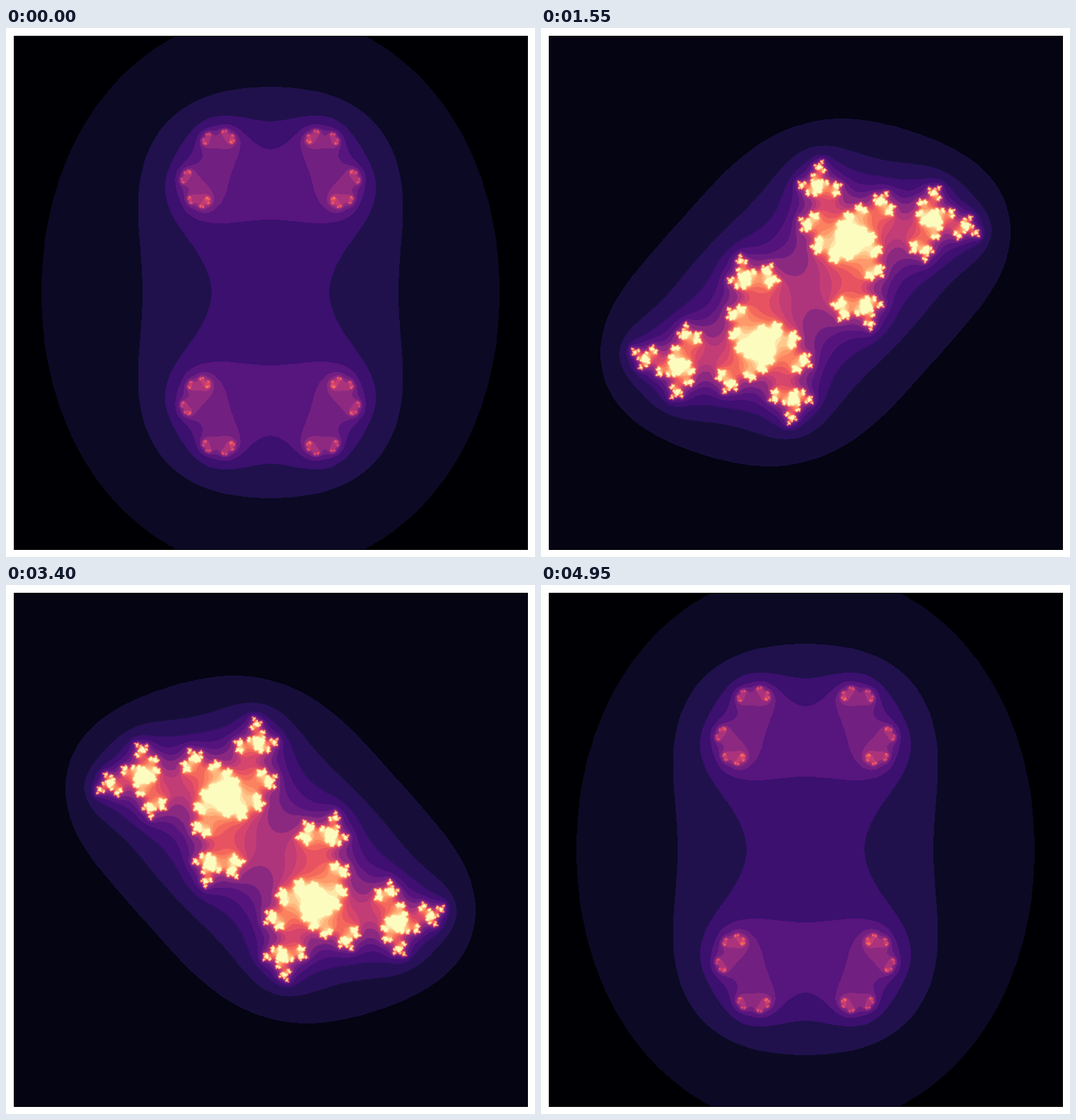
Write an HTML page with a canvas that moves like this. It is 748 px wide and 748 px high and loops after 5000 ms.

```html
<!DOCTYPE html>
<html lang="en">
<head>
<meta charset="utf-8">
<title>Julia set</title>
<style>
  html, body { margin: 0; width: 100%; height: 100%; overflow: hidden; background: #fff; }
  canvas { display: block; }
</style>
</head>
<body>
<canvas id="stage" width="748" height="748"></canvas>
<script>
const STAGE = 748, FRAMES = 100, FRAME_MS = 50;
const GRID = 800, MAX_STEP = 19, ESCAPE = 4, C_RADIUS = 0.7885;
const MARGIN = 11.2, LEFT = 11, SIZE = STAGE - 2 * LEFT;

// Magma colours at every eighth of 256 levels
const STOPS = (
  '000004 030312 0a0822 130d34 1d1147 29115a 36106b 440f76 51127c 5d177f 6a1c81 ' +
  '762181 832681 902a81 9c2e7f aa337d b73779 c43c75 d0416f dc4869 e75263 ef5d5e ' +
  'f56b5c f9795d fc8961 fd9869 fea772 feb67c fec488 fed395 fde2a3 fcf0b2 fcffc1'
).split(' ').map(hex => [0, 2, 4].map(i => parseInt(hex.substr(i, 2), 16)));

const magma = Array.from({ length: 256 }, (_, level) => {
  const low = STOPS[level >> 3], high = STOPS[(level >> 3) + 1], mix = (level & 7) / 8;
  return low.map((v, i) => Math.round(v + (high[i] - v) * mix));
});

function bSpline(x) {
  x = Math.abs(x);
  if (x < 1) return 2 / 3 - x * x + x * x * x / 2;
  return x < 2 ? (2 - x) ** 3 / 6 : 0;
}

// Smoothing taps that map the grid onto stage pixels
const cell = GRID / (STAGE - 2 * MARGIN);
const taps = Array.from({ length: SIZE }, (_, p) => {
  const centre = (p + LEFT + 0.5 - MARGIN) * cell - 0.5;
  const list = [];
  let sum = 0;
  for (let k = Math.ceil(centre - 2 * cell); k <= centre + 2 * cell; k++) {
    const weight = bSpline((k - centre) / cell);
    list.push({ at: Math.min(GRID - 1, Math.max(0, k)), weight });
    sum += weight;
  }
  list.forEach(tap => tap.weight /= sum);
  return list;
});

function escapeStep(x, y, cx, cy) {
  for (let i = 0; i < MAX_STEP; i++) {
    const nx = x * x - y * y + cx;
    y = 2 * x * y + cy;
    x = nx;
    if (x * x + y * y > ESCAPE * ESCAPE) return i;
  }
  return MAX_STEP;
}

// The set is symmetric about the origin, so half the grid is enough
function juliaGrid(angle) {
  const cx = C_RADIUS * Math.cos(angle), cy = C_RADIUS * Math.sin(angle);
  const grid = new Float32Array(GRID * GRID);
  const coord = i => -2 + 4 * i / (GRID - 1);
  let max = 0;
  for (let row = 0, n = 0; row < GRID / 2; row++) {
    const y = coord(row);
    for (let col = 0; col < GRID; col++, n++) {
      const step = escapeStep(coord(col), y, cx, cy);
      grid[n] = grid[grid.length - 1 - n] = step;
      if (step > max) max = step;
    }
  }
  return { grid, max };
}

function resample(grid) {
  const rows = new Float32Array(SIZE * GRID);
  const out = new Float32Array(SIZE * SIZE);
  for (let y = 0; y < SIZE; y++) {
    for (const { at, weight } of taps[y]) {
      for (let x = 0; x < GRID; x++) rows[y * GRID + x] += weight * grid[at * GRID + x];
    }
  }
  for (let x = 0; x < SIZE; x++) {
    for (const { at, weight } of taps[x]) {
      for (let y = 0; y < SIZE; y++) out[y * SIZE + x] += weight * rows[y * GRID + at];
    }
  }
  return out;
}

// Levels in the same coarse colour box share their mean colour
function reducedPalette(counts) {
  const boxes = new Map();
  const key = ([r, g, b]) => (r >> 5) << 8 | (g >> 4) << 4 | b >> 5;
  magma.forEach((colour, level) => {
    const k = key(colour);
    if (!boxes.has(k)) boxes.set(k, { n: 0, sum: [0, 0, 0] });
    const box = boxes.get(k);
    box.n += counts[level];
    colour.forEach((v, i) => box.sum[i] += v * counts[level]);
  });
  return magma.map(colour => {
    const { n, sum } = boxes.get(key(colour));
    return n ? sum.map(v => Math.round(v / n)) : colour;
  });
}

function renderJulia(angle) {
  const { grid, max } = juliaGrid(angle);
  const levels = Uint8Array.from(resample(grid),
    v => Math.max(0, Math.min(255, Math.floor(v / max * 256))));
  const counts = new Uint32Array(256);
  for (const level of levels) counts[level]++;
  const palette = reducedPalette(counts).map(([r, g, b]) => (255 << 24 | b << 16 | g << 8 | r) >>> 0);

  const canvas = document.createElement('canvas');
  canvas.width = canvas.height = SIZE;
  const image = new ImageData(SIZE, SIZE);
  const pixels = new Uint32Array(image.data.buffer);
  for (let i = 0; i < pixels.length; i++) pixels[i] = palette[levels[i]];
  canvas.getContext('2d').putImageData(image, 0, 0);
  return canvas;
}

const ctx = document.getElementById('stage').getContext('2d');
const cache = [];
const start = performance.now();
let shown = -1;

function draw(frame) {
  // The second half of the turn mirrors the first
  const mirrored = frame >= FRAMES / 2;
  const half = mirrored ? FRAMES - 1 - frame : frame;
  cache[half] ??= renderJulia(2 * Math.PI * half / (FRAMES - 1));

  ctx.fillStyle = '#fff';
  ctx.fillRect(0, 0, STAGE, STAGE);
  ctx.save();
  if (mirrored) ctx.transform(1, 0, 0, -1, 0, STAGE);
  ctx.drawImage(cache[half], LEFT, LEFT);
  ctx.restore();
  ctx.strokeStyle = '#000';
  ctx.strokeRect(LEFT + 0.5, LEFT + 0.5, SIZE, SIZE);
}

function tick() {
  const frame = Math.floor((performance.now() - start) / FRAME_MS) % FRAMES;
  if (frame !== shown) draw(shown = frame);
  requestAnimationFrame(tick);
}
tick();
</script>
</body>
</html>
```
